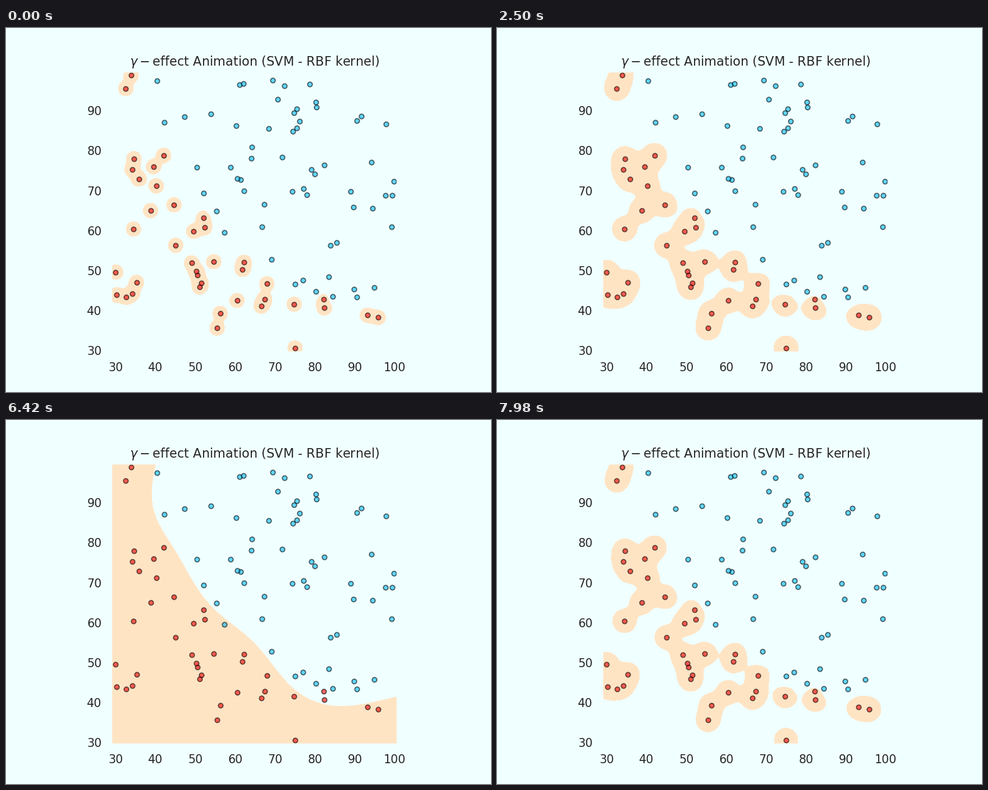
Recreate the animation shown at these times as a matplotlib script. Size 864 px wide and 648 px high, loop 8 s.

```python
import numpy as np
import matplotlib.pyplot as plt
from matplotlib.animation import FuncAnimation
from matplotlib.ticker import MultipleLocator

plt.rcParams["font.family"] = "DejaVu Sans"

BG, REGION, INK = "#f0ffff", "bisque", "0.15"
C = 1.0          # soft-margin penalty
STEP = 0.002     # change of gamma per tick
LEVELS = 200     # number of gamma values
HOLD = 121       # extra ticks spent on the smallest gamma
FRAMES = 400

FAIL = np.array([
    34.62, 78.02, 30.29, 43.89, 35.85, 72.90, 45.08, 56.32, 95.86, 38.23,
    75.01, 30.60, 39.54, 76.04, 67.95, 46.68, 67.37, 42.84, 50.53, 48.86,
    34.21, 44.21, 93.11, 38.80, 61.83, 50.26, 38.79, 65.00, 52.11, 63.13,
    40.24, 71.17, 54.64, 52.21, 33.92, 98.87, 74.79, 41.57, 34.18, 75.24,
    51.55, 46.86, 82.37, 40.62, 51.05, 45.82, 62.22, 52.06, 34.52, 60.40,
    50.29, 49.80, 49.59, 59.81, 32.58, 95.60, 35.29, 47.02, 56.25, 39.26,
    30.06, 49.59, 44.67, 66.45, 66.56, 41.09, 49.07, 51.88, 32.72, 43.31,
    60.46, 42.51, 82.23, 42.72, 42.08, 78.84, 52.35, 60.77, 55.48, 35.57,
]).reshape(-1, 2)

PASS = np.array([
    60.18, 86.31, 79.03, 75.34, 61.11, 96.51, 75.02, 46.55, 76.10, 87.42,
    84.43, 43.53, 82.31, 76.48, 69.36, 97.72, 53.97, 89.21, 69.07, 52.74,
    70.66, 92.93, 76.98, 47.58, 89.68, 65.80, 77.92, 68.97, 62.27, 69.95,
    80.19, 44.82, 61.38, 72.81, 85.40, 57.05, 52.05, 69.43, 64.18, 80.91,
    83.90, 56.31, 94.44, 65.57, 77.19, 70.46, 97.77, 86.73, 62.07, 96.77,
    91.56, 88.70, 79.94, 74.16, 99.27, 61.00, 90.55, 43.39, 97.65, 68.86,
    74.25, 69.82, 71.80, 78.45, 75.40, 85.76, 40.46, 97.54, 80.28, 92.12,
    66.75, 60.99, 64.04, 78.03, 72.35, 96.23, 60.46, 73.09, 58.84, 75.86,
    99.83, 72.37, 47.26, 88.48, 50.46, 75.81, 88.91, 69.80, 94.83, 45.69,
    67.32, 66.59, 57.24, 59.51, 80.37, 90.96, 68.47, 85.59, 75.48, 90.42,
    78.64, 96.65, 94.09, 77.16, 90.45, 87.51, 74.49, 84.85, 89.85, 45.36,
    83.49, 48.38, 42.26, 87.10, 99.32, 68.78, 55.34, 64.93, 74.78, 89.53,
]).reshape(-1, 2)

pts = np.vstack([FAIL, PASS])
y = np.r_[-np.ones(len(FAIL)), np.ones(len(PASS))]
dist2 = ((pts[:, None] - pts) ** 2).sum(-1)
lo, hi = np.minimum(0, C * y), np.maximum(0, C * y)


def fit(gamma, w, tol=1e-3):
    """Solve the SVM dual by SMO; w holds the signed multipliers."""
    K = np.exp(-gamma * dist2)
    w = w.copy()
    v = y - K @ w
    while True:
        up, down = w < hi - 1e-12, w > lo + 1e-12
        i = np.argmax(np.where(up, v, -np.inf))
        gap = np.where(down, v[i] - v, 0)
        if gap.max() < tol:
            break
        curve = np.maximum(2 - 2 * K[i], 1e-12)
        j = np.argmax(np.maximum(gap, 0) ** 2 / curve)
        t = min(gap[j] / curve[j], hi[i] - w[i], w[j] - lo[j])
        w[i] += t
        w[j] -= t
        v -= t * (K[i] - K[j])
    free = up & down
    b = v[free].mean() if free.any() else (v[up].max() + v[down].min()) / 2
    return w, b


gammas = STEP * np.arange(LEVELS, 0, -1)
models = []
w = np.zeros(len(y))
for g in gammas:
    w, b = fit(g, w)
    models.append((w, b))

(x0, y0), (x1, y1) = pts.min(0) - 1, pts.max(0) + 1
gx, gy = np.arange(x0, x1, 0.2), np.arange(y0, y1, 0.2)
dx2 = (gx[:, None] - pts[:, 0]) ** 2
dy2 = (gy[:, None] - pts[:, 1]) ** 2


def decision(k):
    w, b = models[k]
    return (np.exp(-gammas[k] * dy2) * w) @ np.exp(-gammas[k] * dx2).T + b


fig, ax = plt.subplots(figsize=(6.4, 4.8), dpi=135, facecolor=BG)
ax.set_facecolor(BG)
ax.set_aspect("equal")
ax.set(xlim=(gx[0], gx[-1]), ylim=(gy[0], gy[-1]))
ax.set_title(r"$\gamma-$effect Animation (SVM - RBF kernel)",
             fontsize=12, color=INK)
for axis in (ax.xaxis, ax.yaxis):
    axis.set_major_locator(MultipleLocator(10))
ax.tick_params(length=0, pad=9.5, labelsize=11, labelcolor=INK)
for spine in ax.spines.values():
    spine.set(color=BG, linewidth=1.25)

for group, color in ((FAIL, "red"), (PASS, "deepskyblue")):
    ax.scatter(*group.T, s=20, c=color, edgecolors="black",
               linewidths=1, alpha=0.6, zorder=2)

region = None


def update(frame):
    global region
    last = LEVELS - 1
    k = min(frame, last) - max(0, frame - last - HOLD)
    if region is not None:
        region.remove()
    f = decision(k)
    region = ax.contourf(gx, gy, f, levels=[f.min() - 1, 0],
                         colors=[REGION], zorder=0)
    return [region]


anim = FuncAnimation(fig, update, frames=FRAMES, interval=20,
                     repeat=True, repeat_delay=0)
plt.show()
```
